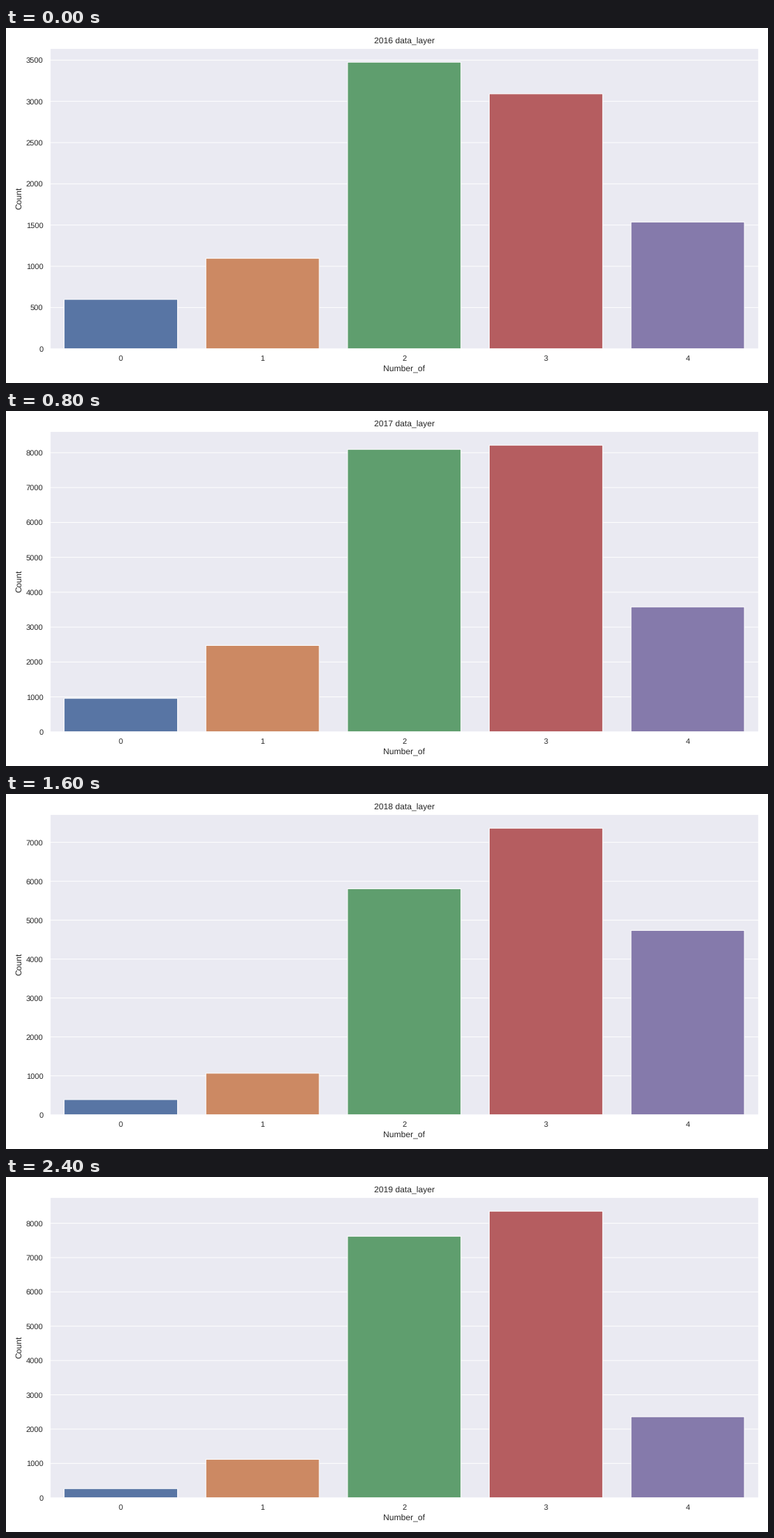
A matplotlib script that plays this animation: 1095 by 511 pixels, repeating every 3200 ms.

```python
import matplotlib.pyplot as plt
from matplotlib.animation import FuncAnimation

W, H, DPI = 1095, 511, 73
LEFT, RIGHT, TOP, BOTTOM = 63.2, 1081.4, 28.6, 461.7
INK = "0.15"
COLORS = ["#5875A4", "#CC8963", "#5F9E6E", "#B55D60", "#857AAB"]
FIRST_YEAR = 2016

# one row per year, one count per category
COUNTS = [
    [598, 1096, 3475, 3091, 1537],
    [956, 2473, 8095, 8214, 3578],
    [389, 1067, 5808, 7364, 4737],
    [264, 1120, 7622, 8352, 2361],
]

plt.rcParams.update({
    "font.family": "Liberation Sans",
    "font.size": 12,
    "text.color": INK,
    "text.hinting": "none",
    "axes.labelcolor": INK,
    "axes.facecolor": "#EAEAF2",
    "axes.edgecolor": "white",
    "axes.linewidth": 1.25,
    "axes.axisbelow": True,
    "axes.titlesize": 12,
    "axes.labelsize": 12,
    "xtick.labelsize": 11,
    "ytick.labelsize": 11,
    "xtick.color": INK,
    "ytick.color": INK,
    "xtick.major.size": 6,
    "ytick.major.size": 6,
    "xtick.bottom": False,
    "ytick.left": False,
    "grid.color": "white",
    "grid.linewidth": 1,
})

fig = plt.figure(figsize=(W / DPI, H / DPI), dpi=DPI, facecolor="white")
ax = fig.add_axes([LEFT / W, 1 - BOTTOM / H,
                   (RIGHT - LEFT) / W, (BOTTOM - TOP) / H])
bars = ax.bar(range(5), [0] * 5, width=0.8, color=COLORS,
              edgecolor="white", linewidth=1, snap=False)
ax.set_xlim(-0.5, 4.5)
ax.set_xticks(range(5))
ax.set_xlabel("Number_of")
ax.set_ylabel("Count")
ax.grid(axis="y")
title = ax.set_title("")


def update(i):
    counts = COUNTS[i]
    for bar, count in zip(bars, counts):
        bar.set_height(count)
    ax.set_ylim(0, max(counts) * 1.05)
    # keep grid lines at their exact height, like the bars
    for line in ax.get_ygridlines():
        line.set_snap(False)
    title.set_text(f"{FIRST_YEAR + i} data_layer")
    return [*bars, title]


anim = FuncAnimation(fig, update, frames=len(COUNTS), interval=800,
                     init_func=lambda: update(0), repeat=True)
plt.show()
```
